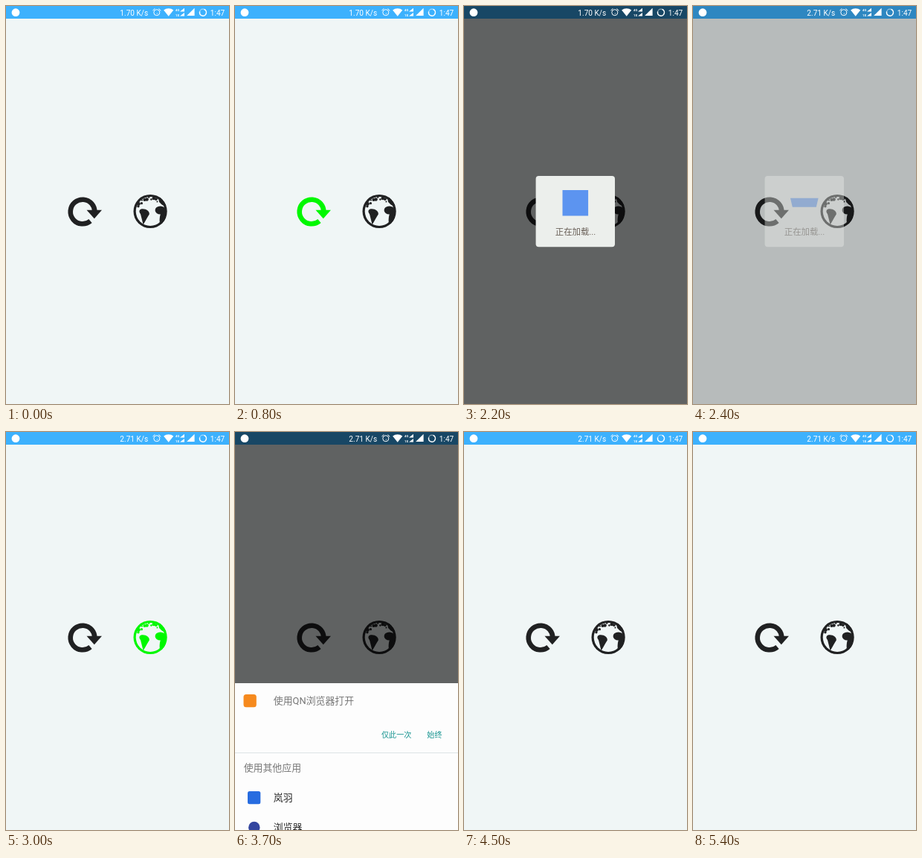
These frames come from a looping animation (300x534 px, 6 s). An HTML page with a canvas:

```html
<!DOCTYPE html>
<html lang="zh-CN">
<head>
<meta charset="utf-8">
<title>Loading dialog and app chooser</title>
<style>
html, body { margin: 0; width: 100%; height: 100%; overflow: hidden; background: #f0f6f6; }
canvas { display: block; width: 100vw; height: 100vh; }
</style>
</head>
<body>
<canvas id="stage"></canvas>
<script>
const W = 300, H = 534, LOOP = 6000, STEP = 100;
const INK = '#202122', PAPER = '#f0f6f6', GREEN = '#00f800', WHITE = '#fff';
const FONT = 'Roboto, "Noto Sans CJK SC", "Noto Sans CJK", sans-serif';
const canvas = document.getElementById('stage');
const layer = document.createElement('canvas');
for (const c of [canvas, layer]) {
  c.width = W * (window.devicePixelRatio || 1);
  c.height = H * (window.devicePixelRatio || 1);
}
const stage = canvas.getContext('2d'), overlay = layer.getContext('2d');
let ctx = stage;

const ramp = (t, a, b) => Math.min(1, Math.max(0, (t - a) / (b - a)));
const ease = u => u * u * (3 - 2 * u);
const within = (t, a, b) => t >= a && t < b;
const fit = () => ctx.setTransform(canvas.width / W, 0, 0, canvas.height / H, 0, 0);

// Paints on a separate layer so that its parts fade as one
function group(alpha, shift, paint) {
  ctx = overlay;
  fit();
  ctx.clearRect(0, 0, W, H);
  ctx.translate(0, shift);
  paint();
  ctx = stage;
  ctx.globalAlpha = alpha;
  ctx.drawImage(layer, 0, 0, W, H);
  ctx.globalAlpha = 1;
}

function poly(points, color) {
  ctx.fillStyle = color;
  ctx.beginPath();
  for (const [x, y] of points) ctx.lineTo(x, y);
  ctx.fill();
}

function rect(x, y, w, h, color, r = 0) {
  ctx.fillStyle = color;
  ctx.beginPath();
  ctx.roundRect(x, y, w, h, r);
  ctx.fill();
}

function blob(x, y, rx, ry, color, tilt = 0) {
  ctx.fillStyle = color;
  ctx.beginPath();
  ctx.ellipse(x, y, rx, ry, tilt, 0, Math.PI * 2);
  ctx.fill();
}

const disc = (x, y, r, color) => blob(x, y, r, r, color);

function arc(x, y, r, width, color, from = 0, to = Math.PI * 2) {
  ctx.strokeStyle = color;
  ctx.lineWidth = width;
  ctx.beginPath();
  ctx.arc(x, y, r, from, to);
  ctx.stroke();
}

function text(str, x, y, size, color, weight = 400) {
  ctx.font = `${weight} ${size}px ${FONT}`;
  ctx.fillStyle = color;
  ctx.fillText(str, x, y);
}

// Text placed by the vertical centre of its Chinese glyphs
const label = (str, x, mid, size, color) => text(str, x, mid + size * 0.33, size, color);

function refreshIcon(color) {
  arc(103, 276, 16.3, 6.6, color, 0.87, Math.PI * 2 - 0.05);
  poly([[108.5, 273.8], [129, 273.8], [118.8, 285.3]], color);
}

function globeIcon(color) {
  const x = 194.1, y = 275.5, r = 22.6;
  disc(x, y, r, color);
  disc(x, y, r - 3.2, PAPER);
  ctx.save();
  ctx.beginPath();
  ctx.arc(x, y, r, 0, Math.PI * 2);
  ctx.clip();
  // South America: a rounded head with a tapering tail
  blob(x - 8, y + 1.5, 7, 4.5, color, 0.35);
  poly([[x - 14, y], [x - 1.5, y + 4], [x - 9.5, y + 18]], color);
  // Africa and Europe, with a light strait between them
  blob(x + 13.5, y - 1.5, 7, 5.5, color);
  blob(x + 17, y + 7, 4, 11, color, 0.2);
  blob(x + 17, y - 13, 7, 4, color, 0.8);
  // Islands along the northern rim
  for (let i = 0; i < 12; i++) {
    const a = -2.75 + i * 0.18, d = 17.5 + Math.sin(i * 2.4) * 1.6;
    disc(x + d * Math.cos(a), y + d * Math.sin(a), 1.7 + Math.sin(i * 1.7) * 0.7, color);
  }
  ctx.restore();
}

// Right triangle with its right angle at the lower right
const wedge = (right, bottom, w, h) =>
  poly([[right - w, bottom], [right, bottom], [right, bottom - h]], WHITE);

function statusGlyphs(t) {
  const base = 12.8, mid = 8.7;
  disc(13, mid, 5.4, WHITE);
  text(t < 2300 ? '1.70 K/s' : '2.71 K/s', 153.3, base, 10.1, WHITE);

  // Alarm clock: dial, hand and two bells
  arc(202.8, mid, 4, 1, WHITE);
  arc(202.8, mid, 1.6, 0.9, WHITE, 0.6, 1.6);
  arc(202.8, mid, 5.7, 1, WHITE, -2.7, -2);
  arc(202.8, mid, 5.7, 1, WHITE, -1.1, -0.4);

  // Wi-Fi fan
  ctx.fillStyle = WHITE;
  ctx.beginPath();
  ctx.moveTo(218.7, 13.8);
  ctx.arc(218.7, 13.8, 10.6, -2.24, -0.9);
  ctx.fill();

  ['4G', '1X'].forEach((name, i) => {
    const bottom = 7.4 + i * 6.2;
    text(name, 228, bottom, 4.2, WHITE, 700);
    wedge(240, bottom, 6, 4.6);
  });
  wedge(253.6, 13, 10.4, 10.2);

  arc(265, mid, 4.5, 1.2, 'rgba(255,255,255,.5)');
  arc(265, mid, 4.5, 1.4, WHITE, -1.2, 3.4);
  text('1:47', 274.8, base, 10.1, WHITE);
}

// Square that flips about X, then about Y, in perspective
function spinner(t) {
  const phase = (Math.max(0, t - 1256) / 944) % 1;
  const a = -Math.PI * ease(ramp(phase, 0, 0.5));
  const b = -Math.PI * ease(ramp(phase, 0.5, 1));
  const half = 17.3, depth = 200;
  const corners = [[-1, -1], [1, -1], [1, 1], [-1, 1]].map(([sx, sy]) => {
    const x = sx * half * Math.cos(b), z = -sx * half * Math.sin(b);
    const y = sy * half * Math.cos(a) - z * Math.sin(a);
    const near = sy * half * Math.sin(a) + z * Math.cos(a);
    const k = depth / (depth - near);
    return [149.8 + x * k, 264.2 + y * k];
  });
  poly(corners, '#5c94f0');
}

function dialog(t) {
  rect(96.6, 228, 106.4, 95.3, '#ecefec', 4);
  spinner(t);
  label('正在加载...', 122.8, 302.8, 11.4, '#6a6058');
}

function chooser() {
  const left = 51.8, size = 12.9, soft = '#777', dark = '#262626', teal = '#12928e';
  rect(0, 337, W, H - 337, '#fdfdfd');
  rect(11.5, 352, 17.3, 17.3, '#f68a1e', 3.5);
  label('使用QN浏览器打开', left, 360.8, size, soft);
  label('仅此一次', 197, 406.8, 10.1, teal);
  label('始终', 258.3, 406.8, 10.1, teal);
  rect(0, 430, W, 1, '#dde3e5');
  label('使用其他应用', 11.7, 451, size, soft);
  rect(17, 482, 17.3, 17.3, '#276ce0', 2.5);
  label('岚羽', left, 491, size, dark);
  disc(25.8, 530.5, 7.7, '#34469f');
  label('浏览器', left, 531, size, dark);
}

function draw(t) {
  fit();
  rect(0, 0, W, H, PAPER);
  rect(0, 0, W, 17, '#3db1fd');
  refreshIcon(within(t, 700, 1300) ? GREEN : INK);
  globeIcon(within(t, 2900, 3400) ? GREEN : INK);

  const loading = within(t, 1300, 2500), choosing = within(t, 3400, 4500);
  const close = ramp(t, 2250, 2500), leave = ramp(t, 4180, 4500);
  let dim = 0;
  if (loading) dim = ramp(t, 1240, 1530) * (1 - close);
  if (choosing) dim = ramp(t, 3350, 3600) * (1 - leave * leave);
  rect(0, 0, W, H, `rgba(0,0,0,${0.6 * dim})`);

  if (loading) group(ramp(t, 1220, 1410) * (1 - close), 0, () => dialog(t));
  if (choosing) {
    const enter = 1 - ramp(t, 3380, 3680);
    const alpha = ramp(t, 3380, 3600) * (1 - ramp(t, 4160, 4375));
    group(alpha, 43 * enter * enter + 48 * leave, chooser);
  }
  statusGlyphs(t);
}

const start = performance.now();
function tick() {
  const t = (performance.now() - start) % LOOP;
  draw(Math.floor(t / STEP) * STEP);
  requestAnimationFrame(tick);
}
tick();
</script>
</body>
</html>
```
